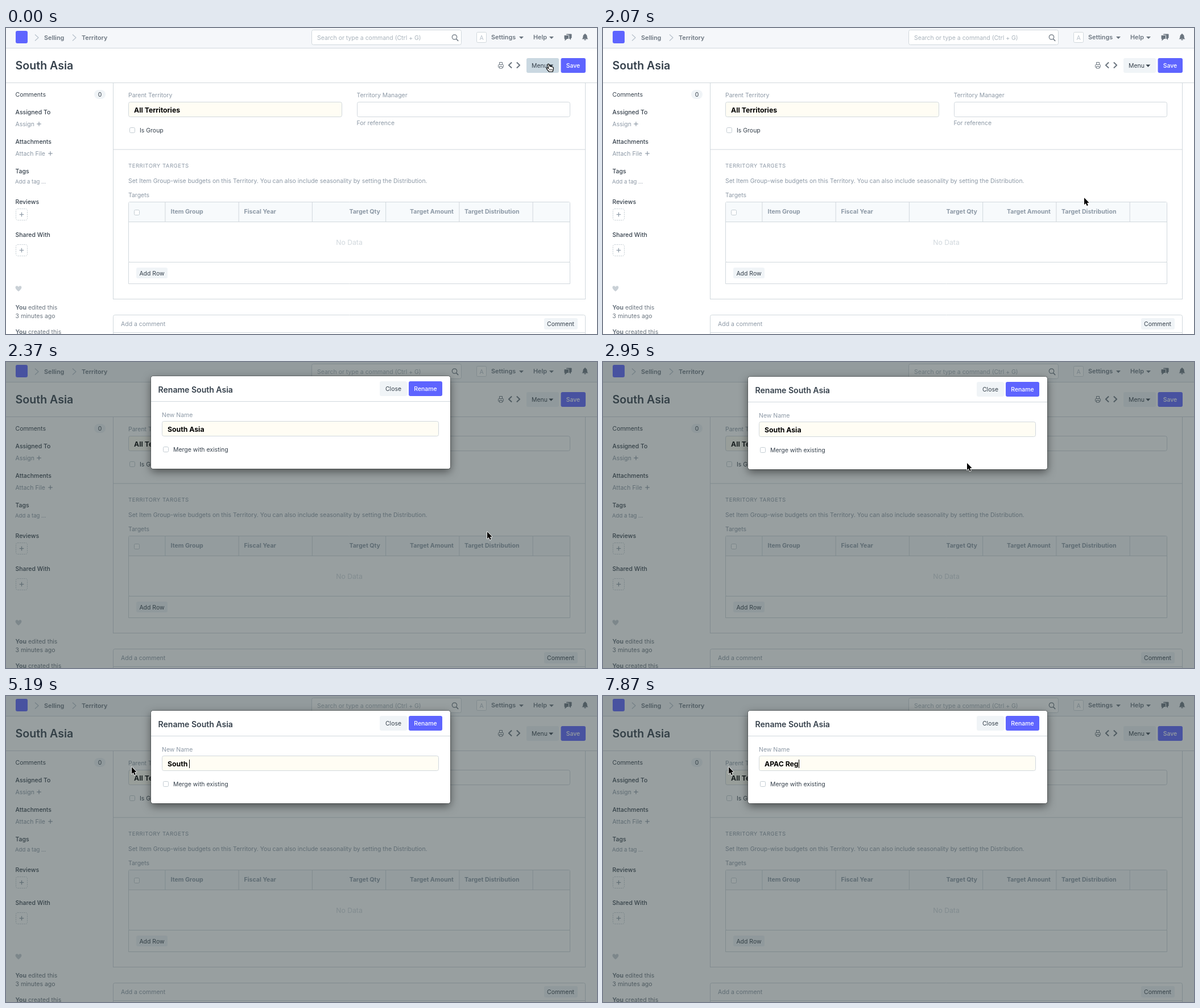
An HTML page with a canvas for the animation above (8000 ms loop, 1039 by 539 pixels).

```html
<!DOCTYPE html>
<html lang="en">
<head>
<meta charset="utf-8">
<title>Rename dialog</title>
<style>
html, body { margin: 0; width: 100%; height: 100%; overflow: hidden; background: #fff; }
canvas { display: block; }
</style>
</head>
<body>
<canvas id="stage" width="1039" height="539"></canvas>
<script>
const W = 1039, H = 539, LOOP = 8000;
const stage = document.getElementById('stage').getContext('2d');
const layer = document.createElement('canvas');
layer.width = W;
layer.height = H;
const layerCtx = layer.getContext('2d');
let c = stage;

const LINE = '#d1d8dd', SOFT = '#f0f4f7', MUTED = '#8d99a6', NAV = '#6c7680';
const DARK = '#36414c', BRAND = '#5e64ff', CREAM = '#fffdf4';
const BASE = 10.48, HEAD = 10.6, FIELD = 12.25;

// Timelines: [start time, value]
const POINTER = [
  [0, ['hand', 954, 63]], [890, ['hand', 925, 120]], [1040, ['hand', 860, 205]],
  [1190, ['hand', 816, 258]], [1480, ['hand', 832, 286]], [1630, ['hand', 847, 300]],
  [2070, ['arrow', 846, 299]], [2660, ['arrow', 790, 258]], [2810, ['arrow', 640, 178]],
  [2960, ['beam', 510, 121]], [3100, ['beam', 452, 119]], [3840, ['beam', 332, 117]],
  [3990, ['arrow', 236, 121]], [4140, ['arrow', 221, 125]]
];
const ENTRY = [
  [0, 'South Asia'], [4890, 'South Asi'], [5040, 'South A'], [5190, 'South '],
  [5340, 'Sou'], [5480, ''], [6080, 'A'], [6230, 'AP'], [6380, 'APA'],
  [6830, 'APAC'], [6980, 'APAC '], [7280, 'APAC R'], [7580, 'APAC Re'], [7870, 'APAC Reg']
];
const CARET = [[0, false], [2960, true], [3400, false], [3840, true], [4140, false], [4590, true]];
// Dialog: vertical offset, opacity, backdrop opacity
const DIALOG = [[0, null], [2220, [-21, 0.7, 0.35]], [2370, [-1, 1, 0.5]], [2510, [0, 1, 0.5]]];
const MENU_OPEN = [[0, false], [450, true], [1920, false]];
const MENU = ['Email', 'Print', 'Jump to field', 'Links', 'Duplicate', 'Copy to Clipboard',
  'Rename', 'Reload', 'Delete', 'Customize', 'Edit Form', 'New Territory'];

function at(list, t) {
  let value = list[0][1];
  for (const [start, v] of list) if (t >= start) value = v;
  return value;
}

// y is the middle of the capital letters
function text(s, x, y, color = DARK, size = BASE, weight = 400, align = 'left', spacing = 0) {
  c.font = `${weight} ${size}px Inter, sans-serif`;
  c.textAlign = align;
  c.letterSpacing = spacing + 'px';
  c.fillStyle = color;
  c.fillText(s, x, y + size * 0.364);
  return c.measureText(s).width;
}

function box(x, y, w, h, fill, stroke, r = 3) {
  c.beginPath();
  c.roundRect(x, y, w, h, r);
  if (fill) { c.fillStyle = fill; c.fill(); }
  if (stroke) { c.strokeStyle = stroke; c.lineWidth = 1; c.stroke(); }
}

function rect(x, y, w, h, color) {
  c.fillStyle = color;
  c.fillRect(x, y, w, h);
}

const hline = (x, y, w) => rect(x, y, w, 1, LINE);
const vline = (x, y, h) => rect(x, y, 1, h, LINE);

function path(points, x, y, fill, stroke, width = 1, closed = true) {
  c.beginPath();
  for (let i = 0; i < points.length; i += 2) c.lineTo(x + points[i], y + points[i + 1]);
  if (closed) c.closePath();
  c.lineJoin = 'round';
  if (stroke) { c.strokeStyle = stroke; c.lineWidth = width; c.stroke(); }
  if (fill) { c.fillStyle = fill; c.fill(); }
}

const chevron = (x, y, w, h, color, width) =>
  path([-w, -h, w, 0, -w, h], x, y, null, color, width, false);
const drop = (x, y, color) => path([-4, -2, 4, -2, 0, 2.2], x, y, color);
const checkbox = (x, y) => box(x, y, 9, 9, '#fff', '#c3ccd2', 2);

function plus(x, y, r = 3.8) {
  rect(x - r, y - 0.6, r * 2, 1.2, MUTED);
  rect(x - 0.6, y - r, 1.2, r * 2, MUTED);
}

function navbar() {
  rect(0, 0, W, 35, '#f5f7fa');
  hline(0, 35, W);
  box(17, 5, 21, 22, BRAND);
  chevron(54, 17, 3, 5.5, '#b8c2cc', 1.2);
  chevron(120, 17, 3, 5.5, '#b8c2cc', 1.2);
  text('Selling', 67, 17, NAV, 10.8, 600);
  text('Territory', 133, 17, NAV, 10.8, 600);

  box(537.5, 3.5, 263, 26, '#fff', LINE);
  text('Search or type a command (Ctrl + G)', 547, 17, '#a9b3bc');
  c.beginPath();
  c.arc(788.5, 16, 4.2, 0, Math.PI * 2);
  c.strokeStyle = NAV;
  c.lineWidth = 1.2;
  c.stroke();
  path([0, 0, 3.6, 3.8], 791.6, 19.2, null, NAV, 1.6, false);

  box(827.5, 7.5, 17, 18, '#fff', LINE, 2);
  text('A', 836, 17, '#b8c2cc', 10.5, 400, 'center');
  text('Settings', 853, 16.5, NAV, 10.8, 600);
  drop(906, 17, NAV);
  text('Help', 927, 16.5, NAV, 10.8, 600);
  drop(959, 17, NAV);

  // speech bubbles
  box(985, 10.5, 9.5, 7.5, NAV, null, 1);
  path([0, 0, 4, 0, 4, 3.5], 989, 17.5, NAV);
  box(981, 12.5, 8.5, 7, NAV, '#f5f7fa', 1);
  path([0, 0, 4, 0, 0, 3.5], 982.5, 19, NAV);
  // bell
  c.beginPath();
  c.moveTo(1012.5, 19.5);
  c.quadraticCurveTo(1014.5, 18, 1014.5, 14.5);
  c.quadraticCurveTo(1014.8, 11.2, 1018, 11);
  c.quadraticCurveTo(1021.2, 11.2, 1021.5, 14.5);
  c.quadraticCurveTo(1021.5, 18, 1023.5, 19.5);
  c.fillStyle = NAV;
  c.fill();
  rect(1017.2, 10, 1.6, 2, NAV);
  rect(1016.5, 20, 3, 1.4, NAV);
}

function header(active) {
  text('South Asia', 16.5, 66, DARK, 19.6, 600);
  // printer
  box(865.5, 64.5, 9, 5, null, NAV, 1);
  box(867.5, 60.5, 5, 4, '#fff', NAV, 0);
  box(867.5, 67.5, 5, 3.5, '#fff', NAV, 0);
  chevron(886.5, 65.5, -2.6, 5, NAV, 2);
  chevron(900.5, 65.5, 2.6, 5, NAV, 2);
  box(915, 53, 57, 26, active ? '#cad8e1' : SOFT);
  text('Menu', 924, 66, DARK);
  drop(958.3, 66.5, DARK);
  box(975.5, 53, 43.5, 26, BRAND);
  text('Save', 997, 66, '#fff', BASE, 500, 'center');
  hline(0, 96, W);
}

function sidebar() {
  text('Comments', 16.5, 117);
  box(155, 109, 20, 16, SOFT, null, 8);
  text('0', 165, 117, DARK, BASE, 400, 'center');
  const heads = [['Assigned To', 148.5], ['Attachments', 200.5], ['Tags', 252.5],
    ['Reviews', 306], ['Shared With', 364]];
  for (const [s, y] of heads) text(s, 16.5, y, DARK, BASE, 500);
  text('Assign', 16.5, 169, MUTED);
  plus(58, 169);
  text('Attach File', 16.5, 221, MUTED);
  plus(78, 221);
  text('Add a tag ...', 16, 270.5, MUTED, 9.55);
  for (const y of [318.5, 381.5]) {
    c.setLineDash([2, 1.5]);
    box(17.5, y, 20, 20, null, '#c3ccd2');
    c.setLineDash([]);
    plus(27.5, y + 10);
  }
  c.beginPath();
  c.moveTo(22, 464);
  c.bezierCurveTo(14, 458, 16.5, 454, 19.3, 454.2);
  c.quadraticCurveTo(21.2, 454.4, 22, 456.2);
  c.quadraticCurveTo(22.8, 454.4, 24.7, 454.2);
  c.bezierCurveTo(27.5, 454, 30, 458, 22, 464);
  c.fillStyle = '#c9d0d6';
  c.fill();
  for (const [s, y] of [[' edited this', 492.5], [' created this', 535.5]]) {
    const w = text('You', 16.5, y, NAV, BASE, 700);
    text(s, 16.5 + w, y, NAV);
  }
  text('3 minutes ago', 16.5, 507.5, NAV);
}

function form() {
  vline(188, 97, 381);
  vline(1018, 97, 381);
  hline(188, 477, 831);
  text('Parent Territory', 215, 118.5, MUTED);
  box(215.5, 130.5, 375, 26, CREAM, LINE);
  text('All Territories', 225, 144.5, '#000', FIELD, 700);
  checkbox(217.5, 175.5);
  text('Is Group', 235, 180);
  text('Territory Manager', 616.5, 118.5, MUTED);
  box(617.5, 130.5, 374, 26, '#fff', LINE);
  text('For reference', 616.5, 167.5, MUTED);
  hline(188, 213.5, 831);

  text('TERRITORY TARGETS', 215, 243, MUTED, 9.55, 400, 'left', 0.5);
  text('Set Item Group-wise budgets on this Territory. You can also include seasonality by setting the Distribution.',
    215, 269, MUTED);
  text('Targets', 215, 294.5, MUTED);
  box(215.5, 306.5, 776, 106, null, LINE, 2);
  rect(216, 307, 775, 34, '#f7fafc');
  hline(216, 341, 775);
  for (let i = 0; i < 6; i++) vline(279.4 + 129.25 * i, 307, 34);
  checkbox(225.5, 320.5);
  const heads = [['Item Group', 289.5], ['Fiscal Year', 418.5], ['Target Qty', 658, 'right'],
    ['Target Amount', 787, 'right'], ['Target Distribution', 806]];
  for (const [s, x, align] of heads) text(s, x, 323.5, MUTED, HEAD, 700, align);
  text('No Data', 603.5, 377.5, LINE, 12.2, 400, 'center');
  box(215.5, 412.5, 776, 38, null, LINE, 0);
  box(229, 422, 55, 19, SOFT);
  text('Add Row', 256.5, 432, DARK, BASE, 400, 'center');

  box(188.5, 505.5, 830, 60, null, LINE);
  hline(189, 536, 829);
  text('Add a comment', 202, 521.5, MUTED);
  box(946, 511, 59, 20, SOFT);
  text('Comment', 975, 521.5, DARK, BASE, 400, 'center');
}

function shadow(blur, y, alpha) {
  c.shadowColor = `rgba(0,0,0,${alpha})`;
  c.shadowBlur = blur;
  c.shadowOffsetY = y;
}

function menu(pointerY) {
  const x = 797, y = 82, row = 32;
  c.save();
  shadow(8, 4, 0.16);
  box(x + 0.5, y + 0.5, 174, 394, '#fff');
  c.restore();
  box(x + 0.5, y + 0.5, 174, 394, '#fff', LINE);
  MENU.forEach((s, i) => {
    const top = y + 5 + i * row;
    if (pointerY >= top && pointerY < top + row) rect(x + 1, top, 173, row, '#f5f7fa');
    text(s, x + 14, top + row / 2);
  });
}

// Dims the page and casts the dialog's shadow, leaving the dialog area clear
function backdrop(dy, dim) {
  c.save();
  c.beginPath();
  c.rect(0, 0, W, H);
  c.roundRect(255, 26 + dy, 526, 163, 4);
  c.clip('evenodd');
  rect(0, 0, W, H, `rgba(51,65,67,${dim})`);
  shadow(15, 5, 0.5);
  box(255, 26 + dy, 526, 163, '#000', null, 4);
  c.restore();
  box(254.5, 25.5 + dy, 527, 164, null, 'rgba(0,0,0,0.25)', 4);
}

function dialog(entry, caret, settled) {
  box(255, 26, 526, 163, '#fff', null, 4);
  text('Rename South Asia', 267.5, 49.5, DARK, 14.05, 600);
  box(657, 35, 48, 26, SOFT);
  text('Close', 681, 48.5, DARK, BASE, 400, 'center');
  box(708, 35, 59, 26, BRAND);
  text('Rename', 737.5, 48.5, '#fff', BASE, 500, 'center');
  hline(255, 70, 526);
  text('New Name', 274, 94, MUTED);
  box(274.5, 105.5, 486, 26, settled ? CREAM : '#fff', LINE);
  const w = text(entry, 284, 119.5, '#000', FIELD, 700);
  if (caret) rect(Math.round(284 + w), 112, 1, 15, '#000');
  checkbox(276.5, 150.5);
  text('Merge with existing', 294, 155);
}

function pointer([kind, x, y]) {
  if (kind === 'arrow') {
    path([0, 0, 0, 12.2, 2.8, 9.7, 4.7, 14.2, 6.8, 13.3, 4.9, 9, 8.6, 8.8], x, y, '#000', '#fff', 1.6);
  } else if (kind === 'beam') {
    const mark = [-3, -7, -1, -6.5, 0, -5.3, 1, -6.5, 3, -7];
    const flip = mark.map((v, i) => i % 2 ? -v : v);
    for (const [color, w] of [['rgba(255,255,255,0.7)', 2.6], ['#000', 1.1]]) {
      path(mark, x, y, null, color, w, false);
      path(flip, x, y, null, color, w, false);
      path([0, -5.5, 0, 5.5], x, y, null, color, w, false);
      path([-1.8, 2, 1.8, 2], x, y, null, color, w, false);
    }
  } else {
    c.beginPath();
    c.moveTo(x - 1.8, y + 1.2);
    c.quadraticCurveTo(x - 0.8, y - 0.6, x + 0.7, y + 1);
    c.lineTo(x + 2.1, y + 4.8);
    c.quadraticCurveTo(x + 3.5, y + 3.8, x + 4.4, y + 5.2);
    c.quadraticCurveTo(x + 5.8, y + 4.4, x + 6.6, y + 5.8);
    c.quadraticCurveTo(x + 8.4, y + 5.4, x + 8.4, y + 7.6);
    c.quadraticCurveTo(x + 8.4, y + 10.4, x + 7, y + 14);
    c.lineTo(x + 0.8, y + 14);
    c.quadraticCurveTo(x - 1.6, y + 11.6, x - 3.8, y + 8.6);
    c.quadraticCurveTo(x - 3.6, y + 6.6, x - 1.6, y + 7.4);
    c.lineTo(x - 0.2, y + 8.4);
    c.closePath();
    c.lineJoin = 'round';
    c.fillStyle = '#fff';
    c.fill();
    c.strokeStyle = '#000';
    c.lineWidth = 1.2;
    c.stroke();
    for (let i = 0; i < 3; i++) path([0, 0, 0.1, 2.6], x + 1.6 + i * 2, y + 9, null, '#000', 0.8, false);
  }
}

function draw(t) {
  const open = at(MENU_OPEN, t), spot = at(POINTER, t), pose = at(DIALOG, t);
  c = stage;
  rect(0, 0, W, H, '#fff');
  navbar();
  header(t < 450 || open);
  sidebar();
  form();
  if (open) menu(spot[2]);
  if (pose) {
    const [dy, alpha, dim] = pose;
    backdrop(dy, dim);
    c = layerCtx;
    c.clearRect(0, 0, W, H);
    dialog(at(ENTRY, t), at(CARET, t), alpha === 1);
    c = stage;
    c.globalAlpha = alpha;
    c.drawImage(layer, 0, dy);
    c.globalAlpha = 1;
  }
  pointer(spot);
}

const begin = performance.now();
function tick() {
  draw((performance.now() - begin) % LOOP);
  requestAnimationFrame(tick);
}
tick();
</script>
</body>
</html>
```
